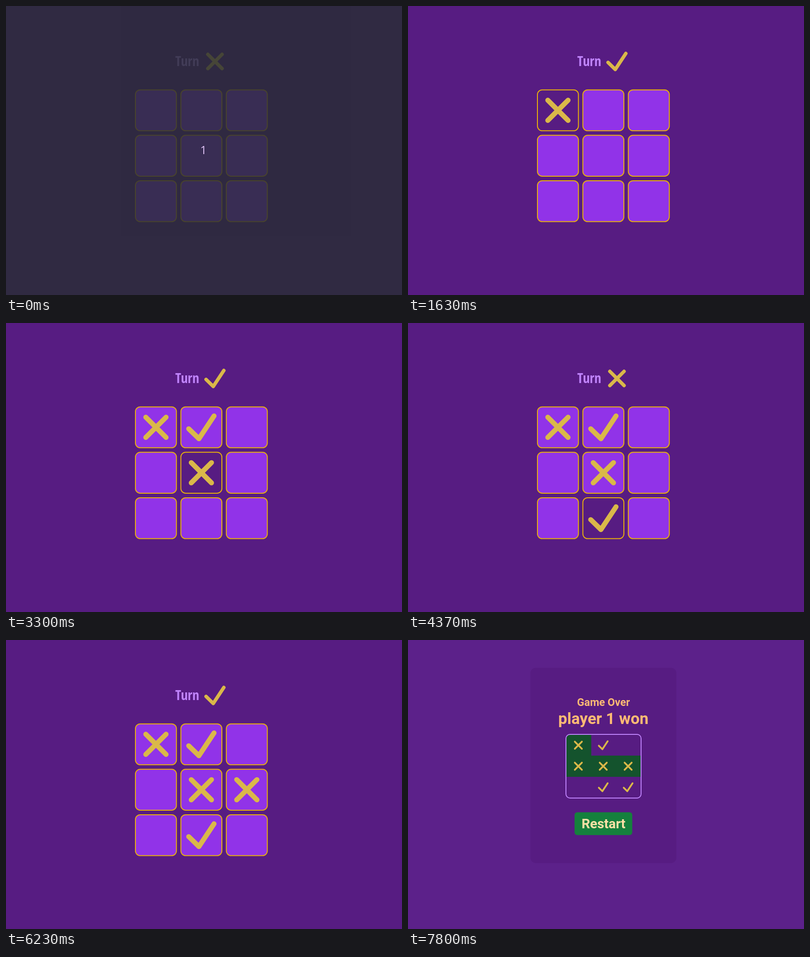
An HTML page for the animation above (8000 ms loop, 875x640 px).

```html
<!DOCTYPE html>
<html lang="en">
<head>
<meta charset="utf-8">
<title>Tic-tac-toe</title>
<style>
  html, body { margin: 0; width: 100%; height: 100%; overflow: hidden; background: #571c82; }
  svg { display: block; width: 875px; height: 640px; }
  text { text-anchor: middle; font: 600 24px Roboto, sans-serif; }
  .turn { font: 700 30px "Open Sans Condensed", "Open Sans", sans-serif; font-stretch: 75%; fill: #c084fc; }
  .cell { stroke: #eab308; stroke-width: 2; }
  .mark { fill: none; stroke: #dab849; stroke-width: 11; stroke-linecap: round; stroke-linejoin: round; }
</style>
</head>
<body>
<svg viewBox="0 0 875 640">
  <defs>
    <path id="cross" d="M-22.4-22.4 22.4 22.4M22.4-22.4-22.4 22.4"/>
    <path id="check" d="M-28 3.2-5.4 25.3 28-25.2"/>
  </defs>
  <rect width="875" height="640" fill="#571c82"/>
  <g id="game">
    <text class="turn" x="400.5" y="133">Turn</text>
    <use id="turn" class="mark" transform="translate(461.7 122.8) scale(.7)"/>
    <g id="board"></g>
  </g>
  <g id="intro">
    <rect width="875" height="640" fill="rgb(39,45,52)" fill-opacity=".82"/>
    <text x="436.5" y="328" style="font:400 25px 'Open Sans',sans-serif" fill="#dfc3f5">1</text>
  </g>
  <g id="result">
    <rect width="875" height="640" fill="#5c218a"/>
    <rect x="270.5" y="61.5" width="322.5" height="432.5" rx="12" fill="#571c82"/>
    <g fill="#fdba74">
      <text x="432" y="146" font-size="24" style="font-size:23.5px">Game Over</text>
      <text x="431.7" y="185.5" style="font-size:35px">player 1 won</text>
    </g>
    <path d="M349 256V219Q349 209 359 209H405V256H515V303H349Z" fill="#14532d"/>
    <rect x="349" y="209" width="166" height="141" rx="9" fill="none" stroke="#c084fc" stroke-width="2"/>
    <g id="summary"></g>
    <rect x="368" y="381.5" width="127.5" height="50.5" rx="6" fill="#15803d"/>
    <text x="432" y="417" style="font-size:29.5px" fill="#fde0a6">Restart</text>
  </g>
</svg>
<script>
const LOOP = 8000, END = 7800;
// [cell, time of the click]
const moves = [[0, 1630], [1, 2500], [4, 3300], [7, 4370], [5, 5900], [8, 6630], [3, END]];
// [cell, pointer enters, pointer leaves]
const hovers = [
  [0, 1200, 2070], [1, 2100, 2900], [4, 2930, 3800], [7, 3830, 4900], [8, 4970, 5600],
  [5, 5630, 6230], [8, 6270, 6770], [7, 6800, 7030], [6, 7030, 7330], [3, 7370, END]
];
const $ = id => document.getElementById(id);
const symbol = turn => turn % 2 ? '#check' : '#cross';
const show = (el, on) => el.setAttribute('visibility', on ? 'visible' : 'hidden');

function add(parent, tag, attrs) {
  const el = document.createElementNS('http://www.w3.org/2000/svg', tag);
  for (const name in attrs) el.setAttribute(name, attrs[name]);
  return parent.appendChild(el);
}

const place = (cell, x, y, dx, dy) => `translate(${x + cell % 3 * dx} ${y + Math.floor(cell / 3) * dy})`;
const onBoard = cell => place(cell, 331.3, 231, 100.4, 100.6);

const cells = Array.from({ length: 9 }, (_, i) => add($('board'), 'rect', {
  class: 'cell', x: -45.3, y: -45.3, width: 90.6, height: 90.6, rx: 10.5, transform: onBoard(i)
}));
const marks = moves.map(([cell], i) => {
  const mark = { class: 'mark', href: symbol(i) };
  add($('summary'), 'use', { ...mark, transform: place(cell, 376.4, 233, 55, 46.5) + ' scale(.35)' });
  return add($('board'), 'use', { ...mark, transform: onBoard(cell) });
});

function draw(t) {
  const over = t >= END;
  show($('intro'), t < 30);
  show($('result'), over);
  $('game').style.display = over ? 'none' : '';
  const hover = hovers.find(([, from, to]) => t >= from && t < to);
  cells.forEach((cell, i) => cell.setAttribute('fill', hover && hover[0] === i ? '#571c82' : '#9133e8'));
  marks.forEach((mark, i) => show(mark, t >= moves[i][1]));
  $('turn').setAttribute('href', symbol(moves.filter(([, time]) => t >= time).length));
}

const start = performance.now();
function tick() {
  draw((performance.now() - start) % LOOP);
  requestAnimationFrame(tick);
}
tick();
</script>
</body>
</html>
```
